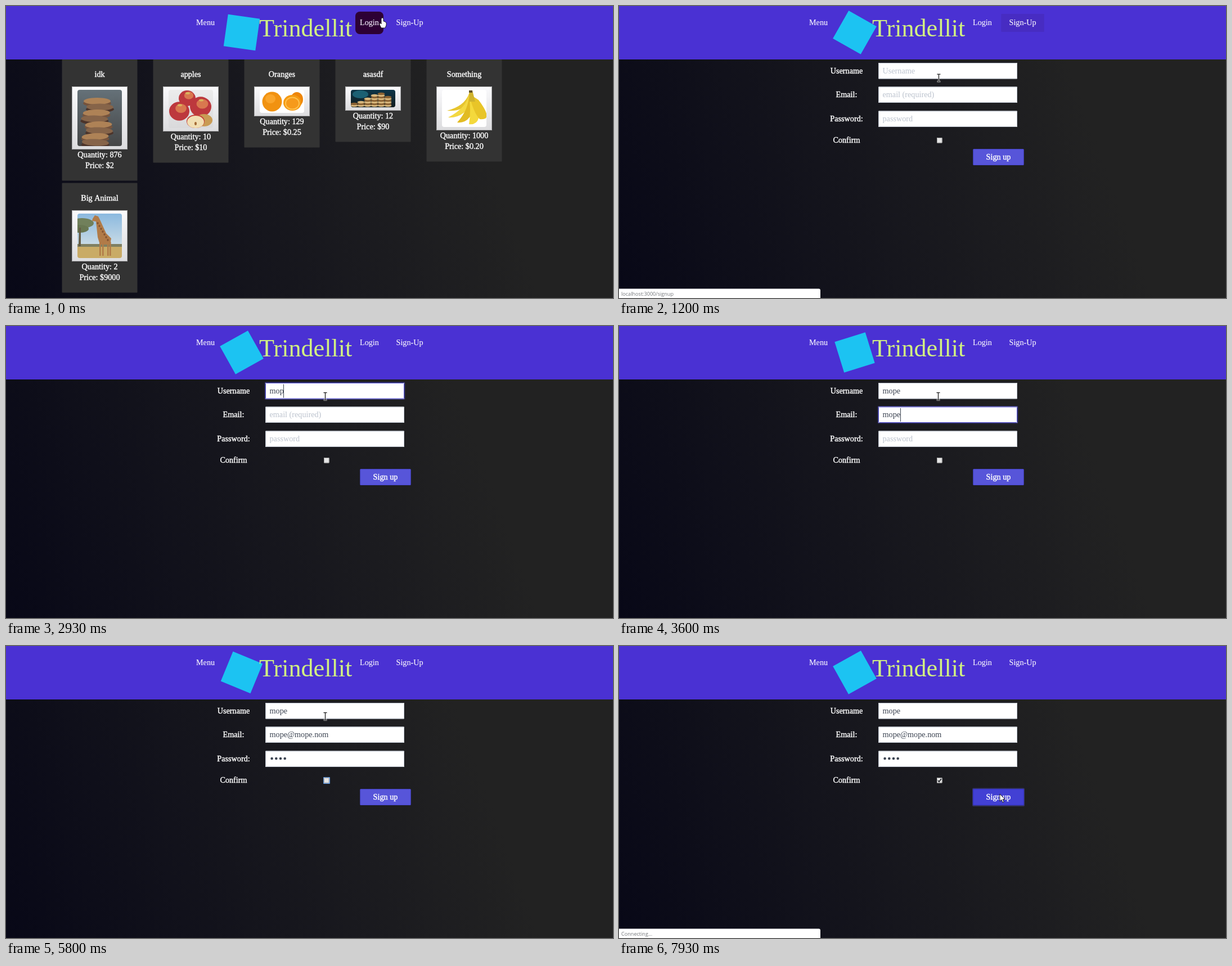
Animation, 1079 px wide and 519 px high, one loop 8 s. Source, as an HTML page with a canvas:

```html
<!DOCTYPE html>
<html lang="en">
<head>
<meta charset="utf-8">
<title>Marketplace sign-up</title>
<style>
html, body { margin: 0; width: 100%; height: 100%; overflow: hidden; background: #222; }
canvas { display: block; width: 1079px; height: 519px; }
</style>
</head>
<body>
<canvas id="stage" width="1079" height="519"></canvas>
<script>
const ctx = document.getElementById('stage').getContext('2d');
const W = 1079, H = 519, LOOP = 8000, STEP = LOOP / 120;
const SERIF = '"Liberation Serif", "Times New Roman", serif';
const SANS = '"Open Sans", "Noto Sans", sans-serif';
const BODY = '14.2px ' + SERIF;

const clamp = v => Math.max(0, Math.min(1, v));
const lerp = (a, b, k) => a + (b - a) * k;

function rect(x, y, w, h, fill, r = 0) {
  ctx.fillStyle = fill;
  ctx.beginPath();
  ctx.roundRect(x, y, w, h, r);
  ctx.fill();
}

function outline(x, y, w, h, color, r = 0) {
  ctx.strokeStyle = color;
  ctx.lineWidth = 1;
  ctx.beginPath();
  ctx.roundRect(x + 0.5, y + 0.5, w - 1, h - 1, r);
  ctx.stroke();
}

function ellipse(x, y, rx, ry, fill, turn = 0) {
  ctx.fillStyle = fill;
  ctx.beginPath();
  ctx.ellipse(x, y, rx, ry, turn, 0, Math.PI * 2);
  ctx.fill();
}

function poly(points, fill) {
  ctx.fillStyle = fill;
  ctx.beginPath();
  points.forEach(([x, y]) => ctx.lineTo(x, y));
  ctx.closePath();
  ctx.fill();
}

function text(str, x, y, { color = '#fff', font = BODY, align = 'left', weight = 0 } = {}) {
  ctx.font = font;
  ctx.textAlign = align;
  ctx.fillStyle = color;
  ctx.fillText(str, x, y);
  if (weight) {
    ctx.strokeStyle = color;
    ctx.lineWidth = weight;
    ctx.strokeText(str, x, y);
  }
}

function vertical(y, h, from, to) {
  const g = ctx.createLinearGradient(0, y, 0, y + h);
  g.addColorStop(0, from);
  g.addColorStop(1, to);
  return g;
}

// Pictures, each drawn in its own 79px wide box
const pictures = {
  cookies(h) {
    rect(0, 0, 79, h, vertical(0, h, '#657178', '#454646'));
    for (let i = 0; i < 8; i++) {
      const x = 35 + 5 * Math.sin(i * 1.7), y = 20 + i * 10.5;
      ellipse(x, y + 4, 25, 6, i % 2 ? '#4c342a' : '#75533d');
      ellipse(x, y, 24, 6, i % 2 ? '#866449' : '#ae8256', 0.06 * Math.sin(i * 3));
    }
  },
  apples(h) {
    rect(0, 0, 79, h, vertical(0, h, '#ececec', '#d9d9db'));
    for (const [x, y, r] of [[33, 15, 15], [19, 38, 18], [57, 30, 19]]) {
      ellipse(x, y, r, r * 0.93, '#bd383d');
      ellipse(x + 3, y - 5, r * 0.55, r * 0.45, '#d9784f');
      ellipse(x + 1, y - r * 0.6, 4, 2, '#d8b35c');
    }
    ellipse(63, 54, 15, 11, '#c99b54');
    ellipse(48, 56, 16, 12, '#c33b36');
    ellipse(48, 57, 15, 11, '#f1dfb3');
    ellipse(48, 60, 2, 3, '#a36b35');
  },
  oranges(h) {
    rect(0, 0, 79, h, '#fff');
    ellipse(22, 21, 17.5, 17.5, '#f19210');
    ellipse(19, 16, 9, 8, '#faa52a');
    ellipse(66, 17, 11, 13, '#ee860a');
    ellipse(58, 23, 16, 14, '#f59a12');
    ellipse(58, 24, 13, 11.5, '#ffc14d');
    ellipse(58, 24, 11, 9.5, '#f69a1b');
  },
  coins(h) {
    rect(0, 0, 79, h, vertical(0, h, '#0c3447', '#131c1e'));
    ellipse(17, 8, 14, 7, '#1b6073');
    for (let i = 0; i < 6; i++) {
      const height = [5, 8, 13, 19, 23, 17][i];
      for (let y = 0; y < height; y += 3) {
        ellipse(6 + i * 12, 28 - y, 6.5, 2.2, y % 2 ? '#8a6233' : '#d8b77d');
      }
    }
  },
  bananas(h) {
    rect(0, 0, 79, h, '#fff');
    const tips = [[9, 37], [11, 49], [27, 58], [48, 61], [67, 52]];
    tips.forEach(([x, y], i) => {
      ctx.fillStyle = ['#e7c52e', '#f3d842', '#e2bb22', '#f4d93c', '#e8c528'][i];
      ctx.beginPath();
      ctx.moveTo(48, 7);
      ctx.quadraticCurveTo(40 + i * 4, 29 + i * 3, x, y);
      ctx.quadraticCurveTo(x + 26, y + 3, 57 + i * 2, 18);
      ctx.closePath();
      ctx.fill();
    });
    poly([[48, 3], [54, 1], [59, 21], [49, 21]], '#d0b32e');
    rect(48, 1, 6, 4, '#655526');
  },
  giraffe(h) {
    rect(0, 0, 79, h, vertical(0, h, '#8bb9df', '#e2e9e9'));
    rect(0, 57, 79, 22, '#c9ab66');
    rect(0, 54, 79, 5, '#7f8062');
    ellipse(8, 17, 21, 9, '#71805b');
    ellipse(4, 27, 16, 7, '#687752');
    poly([[3, 25], [6, 25], [6, 58], [2, 58]], '#645b44');
    const coat = '#b17b48';
    poly([[27, 9], [31, 3], [37, 5], [41, 13], [51, 35], [60, 44], [58, 55], [40, 55], [36, 42], [33, 14], [26, 13]], coat);
    for (const x of [39, 44, 53, 57]) rect(x, 50, 2.6, 25, coat);
    for (let i = 0; i < 7; i++) ellipse(36 + i * 3, 17 + i * 5, 1.7, 2, '#855432');
  }
};

const cards = [
  ['idk', 'Quantity: 876', 'Price: $2', 'cookies', 0, 100],
  ['apples', 'Quantity: 10', 'Price: $10', 'apples', 1, 68],
  ['Oranges', 'Quantity: 129', 'Price: $0.25', 'oranges', 2, 41],
  ['asasdf', 'Quantity: 12', 'Price: $90', 'coins', 3, 31],
  ['Something', 'Quantity: 1000', 'Price: $0.20', 'bananas', 4, 66],
  ['Big Animal', 'Quantity: 2', 'Price: $9000', 'giraffe', 0, 79]
];

function drawCards() {
  cards.forEach(([name, quantity, price, picture, column, h], i) => {
    const x = 99.5 + column * 162, top = i === 5 ? 314.5 : 95;
    const y = i === 5 ? 363 : 143, bottom = y + h + 12, mid = x + 67;
    rect(x, top, 134, bottom + 55.5 - top, '#333', 1);
    const style = { align: 'center', weight: 0.4 };
    text(name, mid, y - 17, style);
    rect(x + 17.5, y, 99, h + 12, vertical(y, h + 12, '#fafafc', '#dcdcde'));
    outline(x + 17.5, y, 99, h + 12, '#a9a9ab');
    ctx.save();
    ctx.translate(x + 27.5, y + 6);
    ctx.beginPath();
    ctx.roundRect(0, 0, 79, h, 4);
    ctx.clip();
    pictures[picture](h);
    ctx.restore();
    text(quantity, mid, bottom + 14, style);
    text(price, mid, bottom + 33, style);
  });
}

function drawBackground() {
  const a = 70 * Math.PI / 180, dx = Math.sin(a), dy = -Math.cos(a);
  const half = (W * Math.abs(dx) + H * Math.abs(dy)) / 2;
  const g = ctx.createLinearGradient(W / 2 - dx * half, H / 2 - dy * half, W / 2 + dx * half, H / 2 + dy * half);
  g.addColorStop(0, '#080817');
  g.addColorStop(0.75, '#222');
  rect(0, 0, W, H, g);
}

// Link highlight: wide and flat at rest, tight and tall when hovered
function drawLink(label, x, width, hover) {
  if (hover > 0) {
    const pad = lerp(15, 8, hover), h = lerp(31, 40, hover);
    ctx.globalAlpha = hover;
    rect(x - pad, 30 - h / 2, width + pad * 2, h, '#2d0035', 8 * hover);
    ctx.globalAlpha = 1;
  }
  text(label, x, 34, { color: '#f4f2fc', weight: 0.15 });
}

function drawHeader(t) {
  rect(0, 0, W, 95, '#4a31d3');
  ctx.save();
  ctx.translate(419, 47);
  ctx.rotate((143 + 45 + t * 0.018) * Math.PI / 180);
  rect(-28.5, -28.5, 57, 57, '#1cc3f2');
  ctx.restore();
  text('Trindellit', 450, 54, { color: '#d2f182', font: '44.2px ' + SERIF });
  text('Menu', 338, 34, { color: '#f4f2fc', weight: 0.15 });
  drawLink('Login', 629, 34, 1 - clamp((t - 130) / 300));
  drawLink('Sign-Up', 693.5, 48, clamp((t - 380) / 300) * (1 - clamp((t - 960) / 270)));
}

// Form state: typed text per field, and focus changes
const KEYS = [
  [2700, 2800, 2930, 3030],
  [3310, 3390, 3470, 3550, 3800, 3960, 4060, 4170, 4290, 4420, 4500, 4580, 4650],
  [5150, 5270, 5390, 5510]
];
const FIELDS = [
  { label: 'Username', hint: 'Username', value: 'mope', y: 101 },
  { label: 'Email:', hint: 'email (required)', value: 'mope@mope.nom', y: 143.5 },
  { label: 'Password:', hint: 'password', value: '', y: 186.5 }
];
const FOCUS = [1600, 3240, 4750, 5650, 7300, LOOP];
const CHECKED = 5900;

function drawField(field, i, t) {
  const { y } = field, base = y + 18.5, focused = t >= FOCUS[i] && t < FOCUS[i + 1];
  const keys = KEYS[i].filter(k => k <= t), count = keys.length;
  text(field.label, 404.5, base, { align: 'center', weight: 0.4 });
  if (focused) rect(459.5, y - 1.5, 250, 31.5, 'rgba(87,85,217,.35)', 2);
  rect(461, y, 247, 28.5, '#fff', 1);
  outline(461, y, 247, 28.5, focused ? '#5755d9' : '#bcc3ce', 1);
  let caret = 468;
  if (!count) {
    text(field.hint, 468.5, base, { color: '#bcc3ce' });
  } else if (i === 2) {
    for (let n = 0; n < count; n++) ellipse(472.6 + n * 7.7, y + 13.5, 2.3, 2.3, '#3b4351');
    caret += count * 7.7 + 1;
  } else {
    const typed = field.value.slice(0, count);
    text(typed, 468.5, base, { color: '#3b4351' });
    caret += ctx.measureText(typed).width;
  }
  const last = count ? keys[count - 1] : FOCUS[i];
  if (focused && (t - last) % 1000 < 500) rect(Math.round(caret), y + 2.5, 1, 24, '#3b4351');
}

function drawForm(t) {
  FIELDS.forEach((field, i) => drawField(field, i, t));

  text('Confirm', 404.5, 243, { align: 'center', weight: 0.4 });
  if (t >= FOCUS[3] && t < FOCUS[4]) rect(564, 233, 12, 12, '#5b94dd', 1);
  rect(565, 234, 9.5, 9.5, '#e6e6e6', 1);
  outline(565, 234, 9.5, 9.5, '#a6a6a6', 1);
  if (t >= CHECKED) {
    ctx.strokeStyle = '#25272d';
    ctx.lineWidth = 1.8;
    ctx.beginPath();
    ctx.moveTo(567, 239);
    ctx.lineTo(569, 241.3);
    ctx.lineTo(572.8, 236);
    ctx.stroke();
  }

  const pressed = t >= FOCUS[4], hover = t >= 6880;
  if (pressed) rect(628, 252.5, 93, 32.5, 'rgba(87,85,217,.4)', 2);
  rect(629.5, 254.3, 90, 28.7, pressed ? '#4240d4' : hover ? '#4b48d6' : '#5755d9', 1);
  outline(629.5, 254.3, 90, 28.7, pressed ? '#3634d2' : '#4b48d6', 1);
  text('Sign up', 674.5, 273, { align: 'center', weight: 0.4 });
}

function drawStatus(t) {
  const label = t >= 400 && t < 1530 ? 'localhost:3000/signup' : t >= 7860 ? 'Connecting...' : '';
  if (!label) return;
  rect(0, 502.5, 358, 17, '#fff', [0, 3, 0, 0]);
  text(label, 4, 514.5, { color: '#74777b', font: '9.1px ' + SANS });
}

const PATH = [
  [0, 669, 21], [70, 669, 21], [250, 692, 5], [430, 715, 28], [940, 717, 30],
  [1190, 568, 128], [1330, 567, 125], [6130, 567, 125], [6450, 625, 188],
  [6730, 660, 225], [6930, 673, 258], [7100, 677, 263], [LOOP, 677, 263]
];

function pointerAt(t) {
  const i = PATH.findIndex(p => p[0] > t), [t0, x0, y0] = PATH[i - 1], [t1, x1, y1] = PATH[i];
  const k = (t - t0) / (t1 - t0);
  return [lerp(x0, x1, k), lerp(y0, y1, k)];
}

const SHAPES = {
  arrow: [[0, 0], [0, 13], [3, 10.3], [5, 15], [7.2, 14], [5.2, 9.6], [9, 9.4]],
  hand: [[-1, 0], [1, 0], [2, 2], [2, 6], [5, 7], [7, 9], [7, 13], [5, 18], [-2, 18], [-5, 12], [-5, 10], [-3.5, 9.5], [-2, 11], [-2, 2]]
};

function drawPointer(t) {
  const [x, y] = pointerAt(t);
  const overField = t >= 960 && x > 461 && x < 708 && FIELDS.some(f => y >= f.y && y <= f.y + 29);
  const overLink = t < 960 && y > 10 && y < 50 && (x < 672 || x > 682);
  ctx.save();
  ctx.translate(x, y);
  if (overField) {
    for (const [color, width] of [['#d5d5d5', 2.4], ['#151515', 1]]) {
      ctx.strokeStyle = color;
      ctx.lineWidth = width;
      ctx.beginPath();
      for (const end of [-6.5, 6.5]) {
        ctx.moveTo(-2.5, end);
        ctx.lineTo(3.5, end);
      }
      ctx.moveTo(0.5, -6.5);
      ctx.lineTo(0.5, 6.5);
      ctx.stroke();
    }
  } else {
    poly(overLink ? SHAPES.hand : SHAPES.arrow, '#fff');
    ctx.strokeStyle = '#111';
    ctx.lineWidth = 0.9;
    ctx.stroke();
  }
  ctx.restore();
}

function draw(now) {
  const t = Math.floor(((now % LOOP) + 4) / STEP) % 120 * STEP;
  drawBackground();
  drawHeader(t);
  if (t < 960) drawCards();
  else drawForm(t);
  drawStatus(t);
  drawPointer(t);
}

const start = performance.now();
function tick() {
  draw(performance.now() - start);
  requestAnimationFrame(tick);
}
tick();
</script>
</body>
</html>
```
